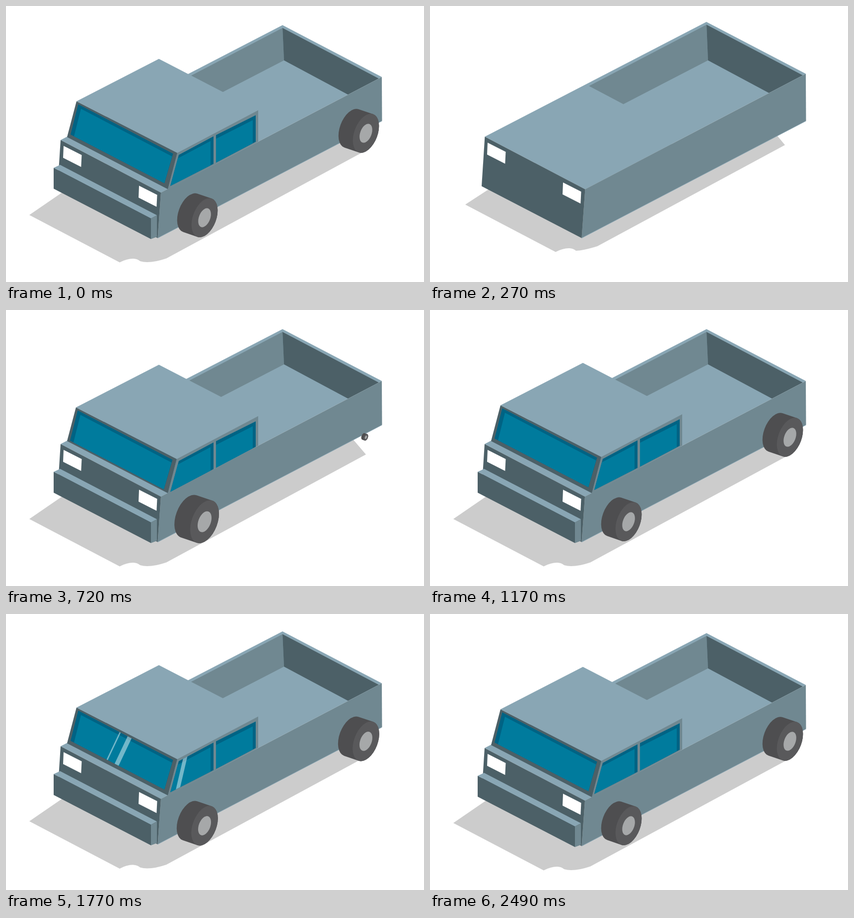
Animation of 842x556 px, one loop 2.99 s. Source, as an HTML page with a canvas:

```html
<!DOCTYPE html>
<html lang="en">
<head>
<meta charset="utf-8">
<title>Pickup truck</title>
<style>
  html, body { margin: 0; width: 100%; height: 100%; overflow: hidden; background: #fff; }
  canvas { display: block; width: 842px; height: 556px; }
</style>
</head>
<body>
<canvas width="842" height="556"></canvas>
<script>
const LOOP = 2990, STEP = 30;
const LIGHT = '#89a6b4', MID = '#708891', DARK = '#4c6067';
const GLASS = '#007b9d', SHADE = '#006384', SHINE = 'rgba(255,255,255,.45)';
const ctx = document.querySelector('canvas').getContext('2d');

const clamp = v => Math.max(0, Math.min(1, v));
const span = (t, from, to) => clamp((t - from) / (to - from));
const smooth = p => (1 - Math.cos(Math.PI * p)) / 2;
const mix = (a, b, p) => [a[0] + (b[0] - a[0]) * p, a[1] + (b[1] - a[1]) * p];
const move = (a, x, y) => [a[0] + x, a[1] + y];

function backOut(p, s = 1.7) {
  const u = p - 1;
  return 1 + (s + 1) * u ** 3 + s * u * u;
}

function trace(points) {
  ctx.beginPath();
  points.forEach(p => ctx.lineTo(p[0], p[1]));
  ctx.closePath();
}

function poly(color, ...points) {
  trace(points);
  ctx.fillStyle = color;
  ctx.fill();
}

function line(color, width, a, b) {
  ctx.beginPath();
  ctx.moveTo(...a);
  ctx.lineTo(...b);
  ctx.strokeStyle = color;
  ctx.lineWidth = width;
  ctx.stroke();
}

function scoped(draw) {
  ctx.save();
  draw();
  ctx.restore();
}

function clipped(points, draw) {
  scoped(() => {
    trace(points);
    ctx.clip();
    draw();
  });
}

function scaleAt(x, y, s) {
  ctx.translate(x, y);
  ctx.scale(s, s);
  ctx.translate(-x, -y);
}

// Everything that changes, as a function of the time in the loop
function poseAt(t) {
  const pose = { slab: 1, wall: 1, bumper: 1, cab: 1, front: 1, rear: 1, shade: 1, bounce: 0, shine: null };
  if (t >= 30 && t < 1180) {
    pose.slab = backOut(span(t, 20, 240), 1.4);
    const rise = 1.095 * (1 - (1 - span(t, 100, 300)) ** 3);
    pose.wall = rise - .095 * smooth(span(t, 370, 640));
    pose.bumper = backOut(span(t, 320, 720), 2.9);
    pose.front = backOut(span(t, 447, 917));
    pose.cab = backOut(span(t, 568, 1038));
    pose.rear = backOut(span(t, 702, 1172));
    pose.shade = smooth(span(t, 320, 640));
  } else if (t >= 1290 && t < 2490) {
    pose.bounce = (1 - Math.cos((t - 1290) / 300 * 2 * Math.PI)) / 2;
    pose.shine = t;
  }
  return pose;
}

function drawShadow(grown) {
  const e = 1 - grown, x = 24 * e, y = -21 * e;
  ctx.beginPath();
  ctx.moveTo(197, 318);
  ctx.lineTo(47 + x, 421 + y);
  ctx.lineTo(229 + x, 516.5 + y);
  ctx.quadraticCurveTo(244 + x, 508.5 + y, 257 + x, 509 + y);
  ctx.quadraticCurveTo(265 + x, 509.5 + y, 270 + x, 514 + y);
  ctx.quadraticCurveTo(289 + 18 * e, 520 - 27 * e, 323 + 14 * e, 508.5 - 24.5 * e);
  ctx.lineTo(725 - 10 * e, 291 - 11 * e);
  ctx.lineTo(690, 250);
  ctx.fillStyle = '#ccc';
  ctx.fill();
}

function drawLamp(x, y, size) {
  scoped(() => {
    scaleAt(x + 18, y + 21, size);
    poly('#fff', [x, y], [x + 36.5, y + 18.5], [x + 35.3, y + 42.5], [x - 1, y + 24]);
  });
}

function drawBody(wall) {
  const bottom = [[104, 363], [305.5, 467.5], [757.5, 231.5], [560, 127]];
  const top = [[110, 270], [312, 376], [757, 143], [557, 38.5]];
  const [a, b, c, d] = top.map((p, i) => mix(bottom[i], p, .2 + .8 * wall));
  const drop = 71 * (1 - wall);
  const back = [557, 44 + drop], right = [751, 146 + drop], floor = [560, 109.5];

  poly(LIGHT, a, b, c, d);
  clipped([back, right, [514, 270 + drop], [320, 167.5 + drop]], () => {
    poly(MID, back, floor, [260, 264.8], [257, 200.6 + drop]);
    poly(DARK, back, floor, [760, 216.5], right);
  });
  poly(MID, b, c, bottom[2], bottom[1]);
  line(LIGHT, 1, bottom[1], [757, 231.8]);
  poly(DARK, a, b, bottom[1], bottom[0]);
  clipped([a, b, bottom[1], bottom[0]], () => {
    const size = clamp((wall - .3) / .5);
    drawLamp(116, 281.8 + drop, size);
    drawLamp(268, 362 + drop, size);
  });
}

function drawBumper(out) {
  if (out <= 0) return;
  const far = [109, 320], near = [304, 421.5], low = [304, 465];
  const farOut = move(far, -13 * out, 6 * out);
  const nearOut = move(near, -12 * out, 6.5 * out);
  const lowOut = move(low, -12 * out, 4.5 * out);
  poly(LIGHT, farOut, far, near, nearOut);
  poly(MID, nearOut, near, low, lowOut);
  poly(DARK, farOut, nearOut, lowOut, move(farOut, 0, 42));
}

// A wide and a narrow gleam crossing one pane
function drawGleam(x, y, lean, gap, widths) {
  [[0, 0], gap].forEach((g, i) => {
    const at = [x + g[0], y + g[1]];
    line(SHINE, widths[i], move(at, -lean[0], -lean[1]), move(at, 2 * lean[0], 2 * lean[1]));
  });
}

function drawWindshield(shine) {
  const pane = [[145.5, 198], [336.5, 297.5], [319, 357], [130, 259]];
  poly(SHADE, ...pane);
  poly(GLASS, [151, 207], [334.5, 303], [319, 357], [137, 262.5]);
  if (shine === null) return;
  const d = .3 * (shine - 1770);
  clipped(pane, () => drawGleam(249 + d, 252 + .52 * d, [-27, 57], [-19, -10], [9, 2.7]));
}

function drawSideGlass(shine) {
  const panes = [
    [[348, 300], [418, 262.5], [418, 318], [331, 362.5]],
    [[423, 260], [503, 220], [503, 273.5], [423, 315.5]]
  ];
  panes.forEach(p => poly(SHADE, ...p));
  poly(GLASS, [346, 307], [412, 272], [412, 321], [331, 362.5]);
  poly(GLASS, [423, 267.5], [497, 230], [497, 276.6], [423, 315.5]);
  if (shine === null) return;
  const d = .252 * (shine - 2160);
  panes.forEach(p => clipped(p, () =>
    drawGleam(459.5 + d, 241 - .52 * d, [-15, 64], [-27.5, 15], [7.5, 2.6])));
}

function drawCab(up, shine) {
  if (up <= 0) return;
  const k = 72 * (1 - up);
  const baseL = [123, 264], baseM = [326, 369], baseR = [508, 273];
  const left = [142 - .26 * k, 192 + k], mid = [345 - .26 * k, 296 + k];
  const right = [508, 210 + .88 * k], back = [308, 106.5 + .88 * k];
  const side = [mid, right, baseR, baseM], front = [left, mid, baseM, baseL];

  poly(LIGHT, left, back, right, mid);
  poly(MID, ...side);
  clipped(side, () => {
    ctx.translate(0, k);
    drawSideGlass(shine);
  });
  poly(DARK, ...front);
  clipped(front, () => {
    ctx.translate(-.26 * k, k);
    drawWindshield(shine);
  });
}

function drawWheel(x, y, size) {
  if (size <= 0) return;
  scoped(() => {
    ctx.translate(x, y);
    ctx.rotate(21 * Math.PI / 180);
    ctx.scale(23.4 * size, 41.2 * size);
    // Unit space: the tyre is a round-capped stroke
    ctx.lineCap = 'round';
    line('#4e4e50', 2, [-1.303, .03], [0, 0]);
    for (const [color, r] of [['#59595b', 1], ['#a6a8a9', .485]]) {
      ctx.beginPath();
      ctx.arc(0, 0, r, 0, 2 * Math.PI);
      ctx.fillStyle = color;
      ctx.fill();
    }
  });
}

function draw(t) {
  const pose = poseAt(t);
  ctx.clearRect(0, 0, 842, 556);
  scoped(() => {
    ctx.translate(0, -4 * pose.bounce);
    scaleAt(431, 297, Math.max(0, pose.slab));
    drawShadow(pose.shade);
    drawBody(pose.wall);
    drawBumper(pose.bumper);
    drawCab(pose.cab, pose.shine);
  });
  const swell = 1 + .018 * pose.bounce;
  drawWheel(725, 256.4, pose.rear * swell);
  drawWheel(400, 426.5, pose.front * swell);
}

const start = performance.now();
function tick() {
  const t = (performance.now() - start) % LOOP;
  draw(Math.floor(t / STEP) * STEP);
  requestAnimationFrame(tick);
}
tick();
</script>
</body>
</html>
```
